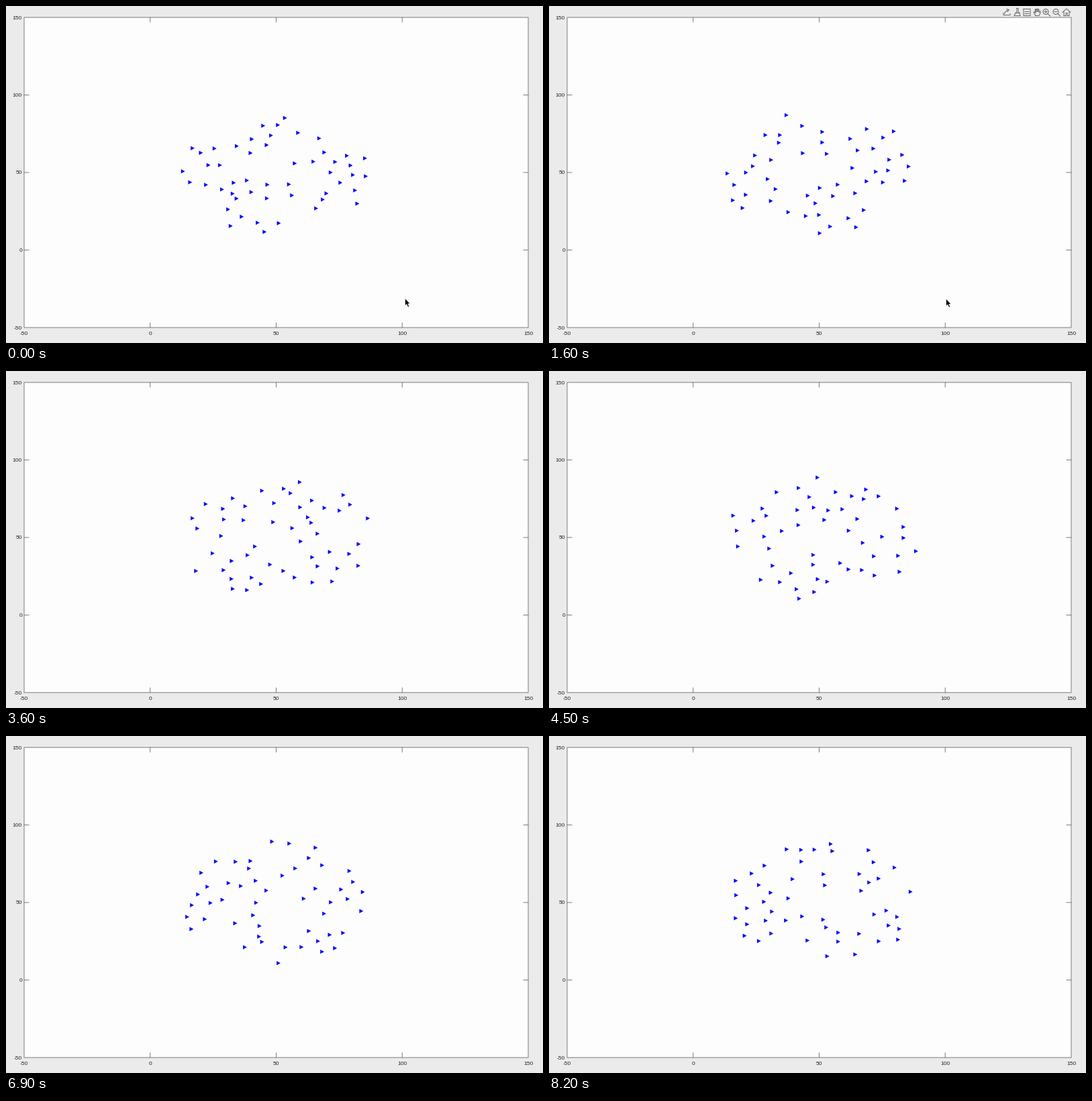
Write a matplotlib script that moves like this. It is 800 by 502 pixels and loops after 8300 ms.

```python
import numpy as np
import matplotlib.pyplot as plt
from matplotlib.animation import FuncAnimation
from matplotlib.collections import PolyCollection
from matplotlib.patches import Circle, Polygon, Rectangle

W, H, DPI = 800, 502, 64
FRAMES, STEP_MS = 83, 100
PX = 72 / DPI  # one pixel in points
LEFT, RIGHT, TOP, BOTTOM = 27, 778, 17, 479
SCALE = np.array([(RIGHT - LEFT) / 200, (TOP - BOTTOM) / 200])
ORIGIN = np.array([LEFT, BOTTOM]) - SCALE * -50
BIRDS, RADIUS, WARM_UP = 50, 38, 12
FRAME_GREY, ICON_GREY = "#7c7c7c", "#666666"


def fly(steps):
    """Flock circling the point (50, 50), kept apart and inside a disc."""
    rng = np.random.default_rng(4)
    angle = rng.uniform(0, 2 * np.pi, BIRDS)
    reach = RADIUS * np.sqrt(rng.uniform(0.02, 1, BIRDS))
    pos = 50 + np.column_stack([np.cos(angle), np.sin(angle)]) * reach[:, None]
    speed = rng.uniform(0.8, 1.3, (BIRDS, 1))
    phase = rng.uniform(0, 2 * np.pi, (BIRDS, 1))
    path = []
    for k in range(WARM_UP + steps):
        path.append(pos)
        d = pos - 50
        r = np.hypot(d[:, 0], d[:, 1])[:, None]
        out = d / np.maximum(r, 4)
        turn = np.column_stack([-d[:, 1], d[:, 0]]) / np.maximum(r, 12)
        sway = 0.35 * np.sin(0.16 * k + phase)
        bound = 0.15 * np.maximum(r - RADIUS, 0)
        gap = pos[:, None] - pos[None]
        dist = np.hypot(gap[..., 0], gap[..., 1]) + 1e-6
        force = np.maximum(8 - dist, 0) / 8 / dist
        push = 0.5 * (gap * force[..., None]).sum(axis=1)
        pos = pos + speed * turn + (sway - bound) * out + push
    return np.array(path[WARM_UP:])


PATH = fly(FRAMES) * SCALE + ORIGIN

fig = plt.figure(figsize=(W / DPI, H / DPI), dpi=DPI, facecolor="#ebebeb")
ax = fig.add_axes([0, 0, 1, 1])
ax.set(xlim=(0, W), ylim=(H, 0))
ax.axis("off")


def line(xs, ys, color):
    return ax.plot(xs, ys, color=color, lw=PX, snap=False)[0]


def label(x, y, value, align):
    ax.text(x, y, str(value), ha=align, va="center_baseline", color="#262626",
            fontsize=8.4 * PX, family="Liberation Sans")


def draw_axes():
    ax.add_patch(Rectangle((LEFT, TOP), RIGHT - LEFT, BOTTOM - TOP, snap=False,
                           fc="#fdfdfd", ec=FRAME_GREY, lw=PX))
    for v in range(-50, 151, 50):
        x, y = ORIGIN + SCALE * v
        label(x, 487.5, v, "center")
        label(24, y, v, "right")
        if -50 < v < 150:
            for edge, way in ((BOTTOM, -7), (TOP, 7)):
                line([x, x], [edge, edge + way], FRAME_GREY)
            for edge, way in ((LEFT, 7), (RIGHT, -7)):
                line([edge, edge + way], [y, y], FRAME_GREY)


def draw_toolbar():
    parts = []

    def stroke(cx, *pts):
        xs, ys = zip(*pts)
        parts.append(line([cx + x for x in xs], [9.5 + y for y in ys],
                          ICON_GREY))

    def lens(cx):
        ring = Circle((cx - 1, 8.5), 4, fc="none", ec=ICON_GREY, lw=PX)
        parts.append(ax.add_patch(ring))
        stroke(cx, (2, 2), (5.5, 5.5))
        stroke(cx, (-3, -1), (1, -1))

    # export
    stroke(682, (-5, 1), (-5, 4), (5, 4), (5, 2))
    stroke(682, (-4, 2), (-1, -2), (3, -4))
    stroke(682, (0, -5), (3, -4), (1, -1))
    # brush
    stroke(698, (-1, -6), (-1, -1), (-3, 1), (-5, 5), (4, 5), (3, 1),
           (1, -1), (1, -6), (-1, -6))
    stroke(698, (-3, 1), (3, 1))
    # data tip
    stroke(712, (-5, -5), (5, -5), (5, 5), (-5, 5), (-5, -5))
    stroke(712, (-3, -1), (3, -1))
    stroke(712, (-3, 2), (3, 2))
    # hand
    stroke(727, (-2, 5), (-5, 0), (-4, -1), (-2, 1), (-3, -4), (-2, -5),
           (-1, -1), (-1, -5), (1, -5), (1, -1), (2, -5), (3, -4), (3, 0),
           (5, -2), (5, 1), (3, 5), (-2, 5))
    # zoom in and out
    lens(741)
    stroke(741, (-1, -3), (-1, 1))
    lens(756)
    # home
    stroke(771, (-6, 0), (0, -5.5), (6, 0))
    stroke(771, (-4, -1), (-4, 5), (-1, 5), (-1, 1), (1, 1), (1, 5),
           (4, 5), (4, -1))
    return parts


draw_axes()
toolbar = draw_toolbar()
BIRD = np.array([(-2.5, -2.8), (-2.5, 2.8), (2.7, 0)])
flock = ax.add_collection(PolyCollection([], fc="#0000ff", ec="#0000ff",
                                         lw=0.4 * PX, snap=False))
ARROW = np.array([(0, 0), (0, 11), (2.4, 8.8), (4.3, 13), (6.2, 12.2),
                  (4.4, 8.1), (7.6, 8)])
cursor = ax.add_patch(Polygon(ARROW, fc="black", ec="white", lw=0.7 * PX,
                              zorder=5))


def update(k):
    flock.set_verts(PATH[k][:, None] + BIRD)
    hovering = 12 <= k < 21
    for part in toolbar:
        part.set_visible(hovering)
    move = np.clip((k - 10) / 4, 0, 1)
    cursor.set_xy(ARROW + (594.5 - 3 * move, 435.5 + 0.5 * move))
    cursor.set_visible(k < 21)
    return [flock, cursor, *toolbar]


anim = FuncAnimation(fig, update, frames=FRAMES, interval=STEP_MS,
                     repeat=True, repeat_delay=0)
plt.show()
```
